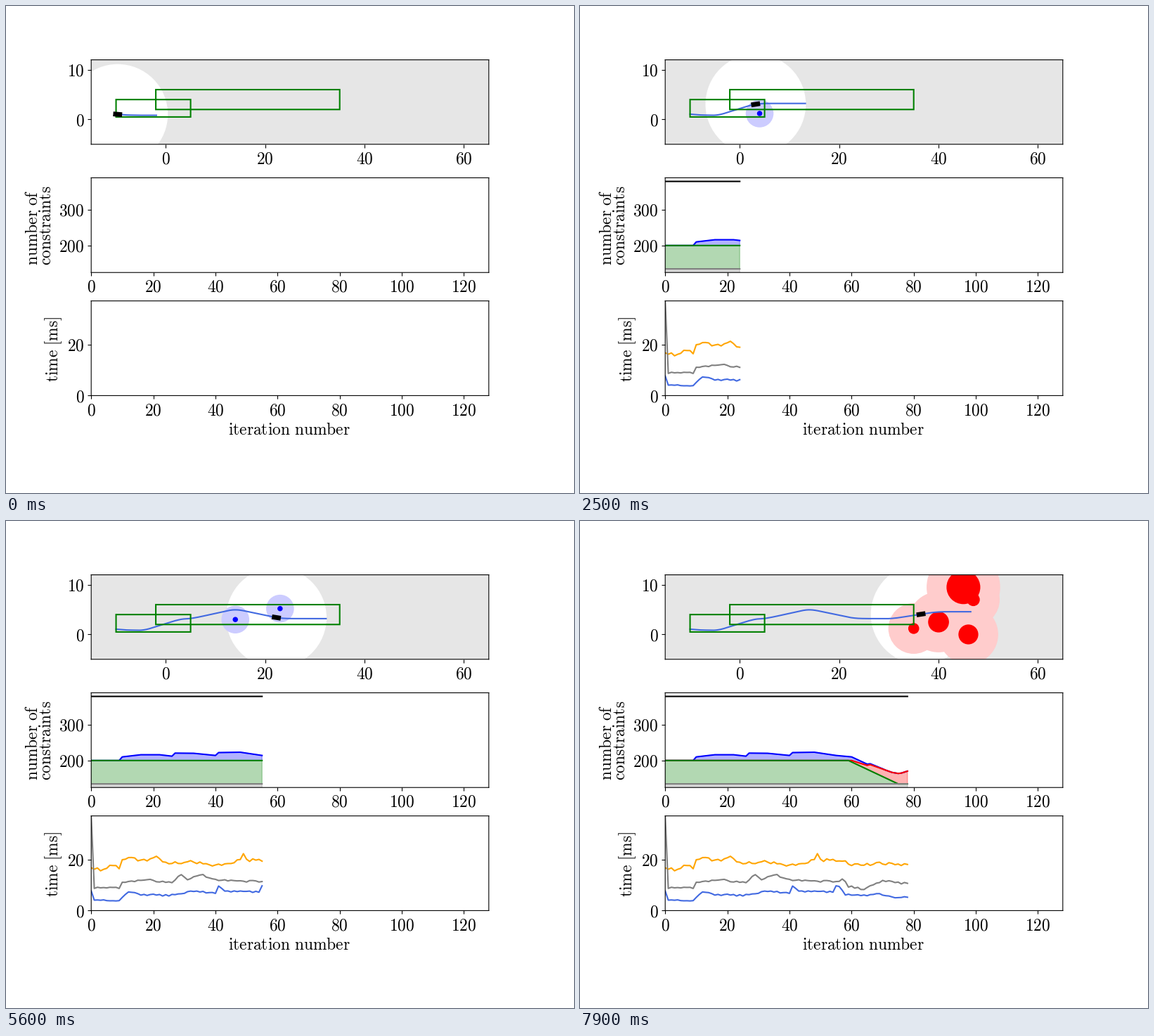
These frames come from a looping animation (808x693 px, 8 s). A matplotlib script:

```python
import matplotlib.pyplot as plt
import numpy as np
from matplotlib.animation import FuncAnimation
from matplotlib.patches import Circle, Polygon, Rectangle

W, H = 808, 693
N = 80
plt.rcParams.update({"mathtext.fontset": "cm", "font.size": 16.9,
                     "path.snap": False})
rng = np.random.default_rng(4)

fig, (world, cons, clock) = plt.subplots(
    3, 1, figsize=(W / 100, H / 100), dpi=100,
    gridspec_kw=dict(left=0.15, right=0.85, bottom=0.2, top=0.9, hspace=0.3))


def ticks(ax, xs, ys):
    ax.set_xticks(xs, [f"${v}$" for v in xs])
    ax.set_yticks(ys, [f"${v}$" for v in ys])


def label(x, y, text, **kw):
    text = text.replace(" ", r"\ ")
    fig.text(x / W, 1 - y / H, rf"$\mathrm{{{text}}}$", va="baseline",
             rotation_mode="anchor", **kw)


def through(x, *points):
    """Straight lines through the key points."""
    return np.interp(x, *zip(*points))


world.set(xlim=(-15, 65), ylim=(-5, 12), aspect="equal", facecolor="0.9")
cons.set(xlim=(0, 128), ylim=(125, 388))
clock.set(xlim=(0, 128), ylim=(0, 37))
ticks(world, range(0, 61, 20), (0, 10))
ticks(cons, range(0, 121, 20), (200, 300))
ticks(clock, range(0, 121, 20), (0, 20))
label(45, 369, "number of", rotation=90, ha="left")
label(64, 369, "constraints", rotation=90, ha="left")
label(74, 488, "time [ms]", rotation=90, ha="center")
label(403, 610, "iteration number", ha="center")

# Driven path: way points rounded off by a moving average
px = np.linspace(-10, 48, 1161)
py = through(px, (-10, 1.06), (-8, .89), (-5, .82), (-3.7, 1.03), (1.8, 2.75),
             (3.3, 3.1), (5, 3.2), (6.8, 3.53), (13, 4.9), (14.1, 4.98),
             (15.2, 4.87), (22.3, 3.38), (23.7, 3.23), (25, 3.19),
             (30, 3.17), (31.5, 3.3), (38.6, 4.4), (40, 4.53), (41.5, 4.57))
py = np.pad(py, 12, mode="reflect", reflect_type="odd")
py = np.convolve(py, np.ones(25) / 25, "valid")
slope = np.gradient(py, px)

# The car speeds up, then cruises
speed = through(np.arange(N - 1) + .5, (0, .186), (10, .595), (27, .602),
                (35, .618))
car_x = -9.68 + np.concatenate([[0], np.cumsum(speed)])
car_y = np.interp(car_x, px, py)
car_tilt = np.arctan(np.interp(car_x, px, slope))

sight = world.add_patch(Circle((0, 0), 10, color="white", zorder=1))
obstacles = []


def obstacle(x, y, r, margin, color, pale, reach):
    discs = [world.add_patch(Circle((x, y), radius, color=c, zorder=z))
             for radius, c, z in [(r + margin, pale, 1.2), (r, color, 1.4)]]
    obstacles.append((x, y, 10 + reach, discs))


for x, y in [(4, 1.2), (14, 3), (23, 5.2)]:
    obstacle(x, y, .43, 2.27, "blue", (.8, .8, 1), .1)
for x, y, r in [(35, 1.2, 1), (40, 2.5, 2), (45, 9.5, 3.3), (46, 0, 1.9),
                (47, 7, 1.2)]:
    obstacle(x, y, r, 4, "red", (1, .8, .8), r)

route, = world.plot([], [], color="royalblue", zorder=2)
for x0, y0, x1, y1 in [(-10, .5, 5, 4), (-2, 2, 35, 6)]:
    world.add_patch(Rectangle((x0, y0), x1 - x0, y1 - y0, fill=False,
                              ec="green", lw=1.5, zorder=2.2))
car = world.add_patch(Polygon(np.zeros((4, 2)), fc="black", lw=0, zorder=3))
corners = np.array([(-.9, -.48), (.9, -.48), (.9, .48), (-.9, .48)])

# Constraint counts per iteration
it = np.arange(N - 1)
base = np.full(N - 1, 135.)
green = through(it, (59, 200), (75, 135))
red = through(it, (60, 200), (65, 186.5), (66, 188.5), (73, 167), (75, 164),
              (76, 165), (78, 170.5))
blue = through(it, (9, 200), (10, 210), (16, 216), (22, 216), (26, 212),
               (27, 220.5), (33, 220), (40, 214), (41, 222), (48, 223),
               (55, 214), (60, 210), (65, 190), (66, 191), (70, 177),
               (72, 100))
blue = np.maximum(blue, red)

bands = []
for lo, hi, c in [(red, blue, "blue"), (green, red, "red"),
                  (base, green, "green"), (base * 0, base, "gray")]:
    area = cons.add_patch(Polygon(np.zeros((3, 2)), color=c, alpha=.3))
    line, = cons.plot([], [], color=c)
    bands.append((lo, hi, area, line))
top, = cons.plot([], [], color="black")

timings = []


def timing(color, jitter, *points):
    data = through(it, *points) + rng.uniform(-jitter, jitter, N - 1)
    timings.append((data, clock.plot([], [], color=color)[0]))


timing("orange", .6, (0, 16.2), (4, 16), (7, 18), (9, 16.3), (10, 19.4),
       (12, 20.8), (16, 19.2), (21, 20.7), (25, 18.3), (32, 19), (40, 17.6),
       (48, 19.5), (49, 22.4), (50, 19.8), (57, 19.5), (60, 17.6),
       (70, 18.5), (78, 18))
timing("gray", .4, (0, 37), (1, 9), (9, 9), (10, 11.3), (18, 12), (26, 10.9),
       (29, 14.3), (31, 12.2), (36, 14), (40, 11.9), (56, 11.2), (57, 12.7),
       (59, 9.5), (64, 8.2), (70, 11.6), (78, 10.5))
timing("royalblue", .3, (0, 7.8), (1, 4), (9, 3.9), (12, 7.2), (16, 6.3),
       (25, 5.9), (33, 7.7), (40, 6.7), (41, 9.5), (43, 7.5), (54, 7.3),
       (55, 9.5), (56, 9.6), (58, 6.3), (65, 5.8), (69, 6.5), (73, 5.1),
       (78, 5.4))

# The plan levels off here until the next obstacle is sensed
level_off = [(10, -5.5), (27, 5), (41, 14.1), (66, 30), (N, 48)]


def update(k):
    x, y, a = car_x[k], car_y[k], car_tilt[k]
    sight.center = x, y
    turn = np.array([(np.cos(a), np.sin(a)), (-np.sin(a), np.cos(a))])
    car.set_xy(corners @ turn + (x, y))

    for ox, oy, reach, discs in obstacles:
        for disc in discs:
            disc.set_visible(np.hypot(ox - x, oy - y) <= reach)

    end = x + through(k, (0, 7.8), (18, 10))
    hold = next(h for stop, h in level_off if k < stop)
    rx = np.linspace(-10, end, 400)
    route.set_data(rx, np.interp(np.minimum(rx, hold), px, py))

    t = it[:k]
    for lo, hi, area, line in bands:
        shown = k > 0 and (hi is not red or k >= 60)
        area.set_visible(shown)
        line.set_visible(shown)
        if shown:
            area.set_xy(np.column_stack([np.append(t, t[::-1]),
                                         np.append(lo[:k], hi[:k][::-1])]))
            line.set_data(t, hi[:k])
    top.set_data(t, np.full(k, 378))
    for data, line in timings:
        line.set_data(t, data[:k])


anim = FuncAnimation(fig, update, frames=N, init_func=lambda: update(0),
                     interval=100, repeat=True, repeat_delay=0, blit=False)
plt.show()
```
